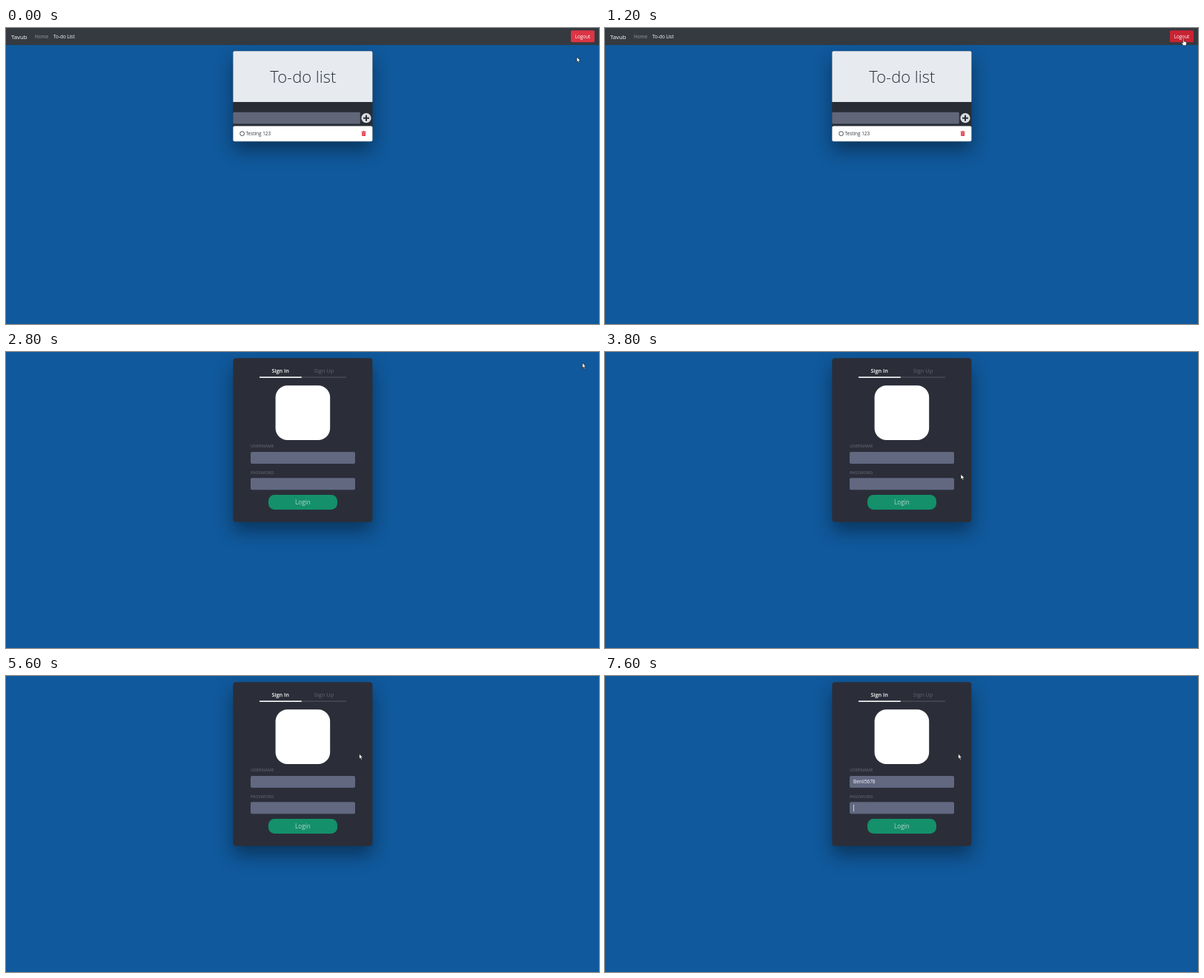
Recreate the animation shown at these times as an HTML page. Size 800 px wide and 400 px high, loop 8 s.

```html
<!DOCTYPE html>
<html lang="en">
<head>
<meta charset="utf-8">
<title>To-do list</title>
<style>
  html, body { margin: 0; width: 100%; height: 100%; overflow: hidden; background: #10599c; }
  svg { display: block; position: absolute; left: 0; top: 0; width: 800px; height: 400px;
        font: 6.4px "Open Sans", "Noto Sans", sans-serif; }
  .shadow { filter: drop-shadow(0 12px 12px rgba(0, 0, 0, .4)); }
  .mid { text-anchor: middle; }
  .title { font-size: 22px; font-weight: 300; fill: #2b2f36; }
  .tab { font-size: 7.3px; font-weight: 600; }
  .label { font-size: 5.8px; font-weight: 600; fill: #5c5f6a; }
  .field { fill: #616880; }
  .caret { stroke: #fff; stroke-width: .7; }
  .pointer { stroke: #111; stroke-width: .6; fill: #fff; stroke-linejoin: round; }
</style>
</head>
<body>
<svg viewBox="0 0 800 400">
  <rect width="800" height="400" fill="#10599c"/>

  <g id="todo">
    <rect width="800" height="23" fill="#343a40"/>
    <text x="7" y="14.6" font-size="7.8" fill="#fff">Tavub</text>
    <text x="39" y="14" fill="#9a9da0">Home</text>
    <text x="64" y="14" fill="#fff">To-do List</text>
    <rect id="logout" x="762" y="3.3" width="32" height="16" rx="1.8"/>
    <text class="mid" x="778" y="14" fill="#fff">Logout</text>

    <rect class="shadow" x="306.4" y="31.3" width="188" height="122" rx="2" fill="#282d35"/>
    <path d="M306.4 100V33.3q0-2 2-2h184q2 0 2 2V100z" fill="#e7ebef"/>
    <text class="mid title" x="400.8" y="73.7">To-do list</text>
    <rect x="306.4" y="113.7" width="171.4" height="15.8" rx="1.5" fill="#616679"/>
    <circle cx="486" cy="121.7" r="6.6" fill="#dadde1"/>
    <path d="M486 117.7v8M482 121.7h8" stroke="#282d35" stroke-width="2"/>
    <rect x="306.4" y="132.5" width="188" height="20.7" rx="2" fill="#fff"/>
    <circle cx="318.6" cy="142.7" r="2.9" fill="none" stroke="#33383e" stroke-width=".9"/>
    <text x="323.5" y="145.2" fill="#33383e">Testing 123</text>
    <g fill="#dc3545">
      <path d="M479.5 139.8h1.9l.4-.8h1.6l.4.8h1.9v.9h-6.2zM480 141.2h5.2l-.3 4.9h-4.6z"/>
      <path d="M481.6 142v3.2M482.6 142v3.2M483.6 142v3.2" stroke="#f3b5bb" stroke-width=".35"/>
    </g>
  </g>

  <g id="login">
    <rect class="shadow" x="306.4" y="8.2" width="188" height="221.5" rx="4" fill="#2b2e38"/>
    <text class="mid tab" x="370.2" y="27.6" fill="#fff">Sign In</text>
    <text class="mid tab" x="429" y="27.6" fill="#565965">Sign Up</text>
    <rect x="399" y="33.6" width="60" height="1" fill="#555864"/>
    <rect x="342" y="33.4" width="56.8" height="1.6" fill="#fff"/>
    <rect x="363.6" y="45.2" width="73.6" height="73.8" rx="16" fill="#fff"/>
    <text class="label" x="330" y="129.4">USERNAME</text>
    <rect class="field" x="330" y="135" width="141" height="16" rx="2"/>
    <text class="label" x="330" y="165">PASSWORD</text>
    <rect class="field" x="330" y="170.2" width="141" height="16" rx="2"/>
    <rect x="354" y="193" width="93" height="20" rx="8.2" fill="#14906a"/>
    <text class="mid" x="400.4" y="206.3" font-size="8.2" fill="#b4d6ca">Login</text>
    <text id="user" x="335" y="145.3" fill="#fff"></text>
    <path id="caret" class="caret" d="M.5 0v9.4"/>
  </g>

  <g id="cursor">
    <path id="arrow" class="pointer" d="M0 0v7.1l1.6-1.4 1.1 2.5 1.2-.5-1.1-2.5h2.1z"/>
    <path id="hand" class="pointer" d="M-.7.7q.7-1.2 1.4 0v2.9l2.5.7q1 .3.9 1.4l-.6 3.5h-3.9l-2.2-3.2q-.1-1.2 1.9-.2z"/>
    <path id="beam" fill="none" stroke="#d5d8e0" stroke-width=".7" d="M-1.5-3.9q1.5 0 1.5.8v6.2q0 .8-1.5.8M1.5-3.9q-1.5 0-1.5.8v6.2q0 .8 1.5.8"/>
  </g>
</svg>
<script>
  const LOOP = 8000, NAME = "Benil5678";
  const $ = id => document.getElementById(id);
  const show = (id, on) => $(id).style.display = on ? "" : "none";

  // time, x, y, pointer shape
  const MOVES = [
    [0, 770, 39, "arrow"], [200, 772, 30, "arrow"], [600, 775, 23, "arrow"],
    [800, 778, 16, "hand"], [1000, 779.5, 15, "hand"], [1200, 780.5, 14.5, "hand"],
    [2800, 777.5, 14.5, "arrow"], [3000, 750, 17, "arrow"], [3200, 682, 24, "arrow"],
    [3600, 570, 80, "arrow"], [3800, 480, 165, "arrow"], [4000, 415, 220, "arrow"],
    [4200, 400, 204, "hand"], [4600, 445, 100, "arrow"], [4800, 430, 148, "beam"],
    [5000, 424, 144, "beam"], [5200, 426, 143, "beam"], [5600, 476.5, 105, "arrow"]
  ];
  // time, letters typed
  const TYPED = [[0, 0], [6200, 3], [6600, 5], [6800, 7], [7000, 8], [7200, 9]];
  const at = (list, t) => list.findLast(row => row[0] <= t);

  function draw(t) {
    const [, x, y, shape] = at(MOVES, t);
    $("cursor").setAttribute("transform", `translate(${x} ${y})`);
    for (const id of ["arrow", "hand", "beam"]) show(id, id === shape);

    const signedIn = t < 2800;
    show("todo", signedIn);
    show("login", !signedIn);
    $("logout").setAttribute("fill", t >= 800 ? "#c82333" : "#dc3545");
    if (signedIn) return;

    const user = $("user"), count = at(TYPED, t)[1], inPassword = t >= 7600;
    user.textContent = NAME.slice(0, count);
    const textWidth = count && !inPassword ? user.getComputedTextLength() : 0;
    $("caret").setAttribute("transform", `translate(${335 + textWidth} ${inPassword ? 173.7 : 138.5})`);
    show("caret", t >= 5200 && t < 5600 || t >= 6200);
  }

  const start = performance.now();
  function tick() {
    draw((performance.now() - start) % LOOP);
    requestAnimationFrame(tick);
  }
  tick();
</script>
</body>
</html>
```
